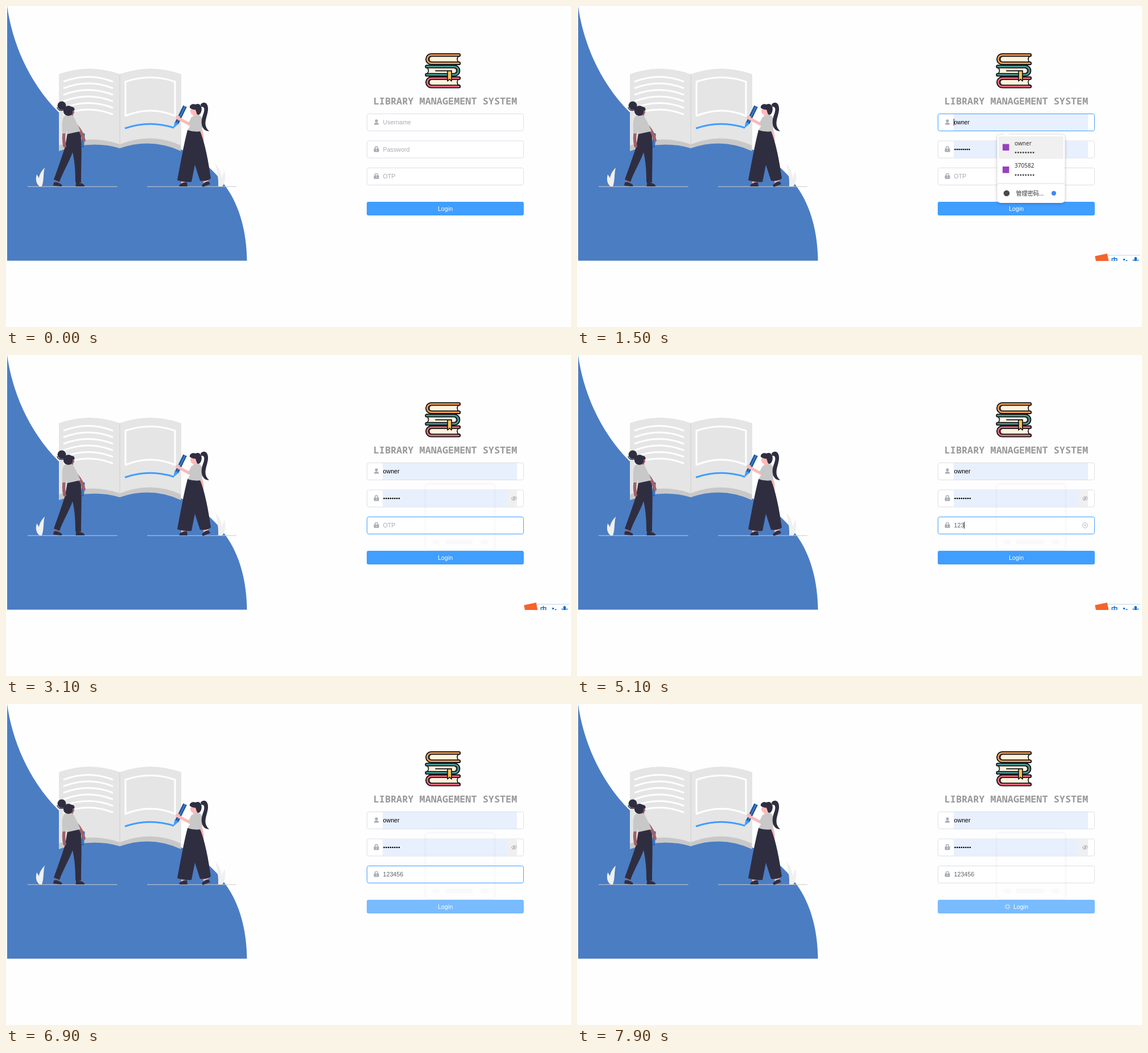
Animation, 993 px wide and 564 px high, one loop 8000 ms. Source, as an HTML page with a canvas:

```html
<!DOCTYPE html>
<html lang="en">
<head>
<meta charset="utf-8">
<title>Library login</title>
<style>
html, body { margin: 0; width: 100%; height: 100%; overflow: hidden; background: #fefefe; }
canvas { display: block; width: 993px; height: 564px; }
</style>
</head>
<body>
<canvas id="stage"></canvas>
<script>
const W = 993, H = 564, LOOP = 8000;
const canvas = document.getElementById('stage');
const dpr = window.devicePixelRatio || 1;
canvas.width = Math.round(W * dpr);
canvas.height = Math.round(H * dpr);
const c = canvas.getContext('2d');

const SANS = '"Liberation Sans", Arial, sans-serif';
const MENU = '"Noto Sans", "Open Sans", sans-serif';
const CJK = '"Noto Sans CJK SC", "Noto Sans CJK", sans-serif';
const MONO = '"Noto Sans Mono", "DejaVu Sans Mono", monospace';
const PLAIN = '#dcdfe6', HOVER = '#c0c4cc', FOCUS = '#409eff', MIXED = '#7eb8f5';
const DARK = '#2f2e41', GREY = '#c8c8c8', PINK = '#ffb8b8', BROWN = '#a0616a';
const ICON = '#a8abb2', TINT = '#e8f0fe';
const USER = 'owner', CODE = '123456';
const TYPED_AT = [4600, 4800, 5100, 5400, 5700, 6000];

function fill(d, color) {
  c.fillStyle = color;
  c.fill(new Path2D(d));
}
function line(d, color, width, cap = 'butt') {
  c.strokeStyle = color;
  c.lineWidth = width;
  c.lineCap = cap;
  c.lineJoin = 'round';
  c.stroke(new Path2D(d));
}
function dot(x, y, r, color) {
  c.fillStyle = color;
  c.beginPath();
  c.arc(x, y, r, 0, Math.PI * 2);
  c.fill();
}
function ring(x, y, r, color, width) {
  c.strokeStyle = color;
  c.lineWidth = width;
  c.beginPath();
  c.arc(x, y, r, 0, Math.PI * 2);
  c.stroke();
}
function rect(x, y, w, h, color) {
  c.fillStyle = color;
  c.fillRect(x, y, w, h);
}
function round(x, y, w, h, r) {
  c.beginPath();
  c.roundRect(x, y, w, h, r);
}
function text(s, x, y, size, color, font = SANS, weight = 400, align = 'left') {
  c.font = `${weight} ${size}px ${font}`;
  c.textAlign = align;
  c.fillStyle = color;
  c.fillText(s, x, y);
}
function bullets(x, y, step, r, color) {
  for (let i = 0; i < 8; i++) dot(x + i * step, y, r, color);
}
// Last value whose time has been reached.
function at(keys, t) {
  let value = keys[0][1];
  for (const [time, v] of keys) if (t >= time) value = v;
  return value;
}

function drawBackdrop() {
  fill('M2 0C10 60 38 132 92 186C160 250 240 215 308 252C340 266 366 288 386 317C412 353 423 400 423.5 447.5H2Z', '#4b7dc3');
}

function drawOpenBook() {
  fill('M93 120Q147 101 200 120Q254 101 307.500 120V255Q255 231 200 250Q150 235 93 255Z', GREY);
  fill('M93 120Q147 101 200 120Q254 101 307.500 120V245Q255 221 200 243Q150 225 93 245Z', '#e5e5e5');
  line('M200 120V249', '#d0d0d0', 1);
  for (let i = 0; i < 6; i++) {
    const y = 133 + i * 11.5;
    line(`M101 ${y}Q145 ${y - 17} 188 ${y}`, '#fff', 3);
  }
  line('M210 133Q254 118 297 133V193Q254 175 210 193Z', '#fff', 3);
  line('M209 215Q252 200 295 214', FOCUS, 3);
}

function drawPlants() {
  const leaf = '#f0f0f0';
  fill('M60 317C55 305 58 294 68 284C65 296 67 306 63 317Z', leaf);
  fill('M59 317C52 312 52 303 54 296C59 303 61 309 62 317Z', leaf);
  fill('M373 317C374 302 370 288 368 277C378 287 381 302 379 317Z', leaf);
  fill('M377 317C378 306 380 296 384 290C387 300 385 312 380 317Z', leaf);
  line('M38 317.300H195.500M248 317.300H405', '#cbcbcb', 1);
}

function drawLeftReader() {
  fill('M87 302L93 305L90 313H84Z M124 306H131V313H124Z', BROWN);
  fill('M84 310Q90 308 98 314Q100 317 96 317L83 315.500Z M123 310Q129 309 137 314Q140 317 136 317H122.500Z', DARK);
  fill('M108 223L131 220C134 240 132 280 132 310L122 310C122 285 120 270 117 257C111 274 100 292 94 309L84 305C91 285 98 266 104 247Z', DARK);
  line('M136 226L134.500 246', '#2465b5', 5, 'round');
  line('M136.500 226L135 246', '#4b8bdc', 1.500);
  line('M125 212Q134 222 137 236', BROWN, 5.500, 'round');
  fill('M108 187H118V197H108Z', BROWN);
  dot(114, 186, 6, BROWN);
  fill('M103 193L117 192Q121 198 127 211L131 220L108 225C107 218 104 213 98.500 209Q99 197 103 193Z', GREY);
  line('M103 218Q100 232 103 246', BROWN, 5.500, 'round');
  fill('M98.500 210L99 224L106 224L107 207Z', GREY);
  dot(98, 175, 7.500, DARK);
  fill('M101 181C104 175 111 174 115 177Q121 177 120.500 183L117 184Q118 192 110 193C103 193 100 188 101 181Z', DARK);
  line('M90 178Q91 185 102 183', DARK, 1.500);
}

function drawRightWriter() {
  line('M342 216Q347 230 344 243', PINK, 5, 'round');
  fill('M308 306H316V313H308Z M346 304L354 303L357 311L348 313Z', PINK);
  fill('M305 314Q313 308 318 310L319 317H304.500Z M344 315Q350 308 356 308L359 313L346 318Z', DARK);
  fill('M319 218L340 217C350 240 356 275 360 303Q352 309 341 307L332 279L326 309Q312 310 301 306C306 280 312 245 319 218Z', DARK);
  line('M300 206L314.500 176', '#3977c4', 7);
  line('M298 205.500L312.500 175.500M302 207L317 177', '#20477f', 1.500);
  fill('M294 215L296.500 203.500L303.500 207Z', FOCUS);
  line('M325 209L304 198', PINK, 5, 'round');
  dot(302, 196, 3.500, PINK);
  fill('M329 185H338V197H329Z', PINK);
  dot(330.500, 185, 6.500, PINK);
  fill('M326 195L339 191Q345 194 346 204L344 220Q330 222 319 218L324 210L320 207Z', GREY);
  fill('M323 179C322 173 329 171 333 173C341 169 346 178 343 186C341 192 336 193 335 188L333 182Q328 183 323 179Z', DARK);
  fill('M342 173C347 167 356 169 355 183C353 198 345 208 357 220C344 220 341 205 346 192C350 182 349 176 343 177Z', DARK);
}

function drawStackedBook(top, color, flip) {
  const bottom = top + 14.5;
  c.save();
  if (flip) {
    c.translate(1535.5, 0);
    c.scale(-1, 1);
  }
  const cover = `M796 ${top}H747.500A7.250 7.250 0 0 0 747.500 ${bottom}H796`;
  line(cover, '#111', 6.4, 'round');
  fill(`M748 ${top + 2}H795Q791 ${top + 7} 795 ${bottom - 2}H748A5 5 0 0 1 748 ${top + 2}Z`, '#fff3dc');
  line(`M748 ${top + 2.300}H795Q791 ${top + 7} 795 ${bottom - 2.300}H748A5 5 0 0 1 748 ${top + 2.300}Z`, '#111', 1.6);
  line(cover, color, 2.8, 'round');
  c.restore();
}

function drawBookStack() {
  drawStackedBook(86.2, '#f49b55', false);
  drawStackedBook(106.4, '#4a9b9b', true);
  drawStackedBook(126.800, '#e8697f', false);
  line('M755 113.800H783', '#111', 1.8, 'round');
  fill('M776 114H783V132L779.500 128.500L776 132Z', '#f8c25c');
  line('M776 114H783V132L779.500 128.500L776 132Z', '#111', 1.6);
}

function drawFrame(y, border) {
  round(634.5, y + 0.5, 275, 30, 3);
  c.fillStyle = '#fff';
  c.fill();
  c.strokeStyle = border;
  c.lineWidth = 1;
  c.stroke();
}
function drawLock(y) {
  c.fillStyle = ICON;
  round(646.5, y - 1.5, 9, 6, 1);
  c.fill();
  line(`M648.500 ${y - 1}V${y - 2.500}A2.500 2.500 0 0 1 653.500 ${y - 2.500}V${y - 1}`, ICON, 1.3);
  rect(650.5, y, 1, 2.5, '#fff');
}
function drawClear(y) {
  ring(893, y, 4.5, ICON, 0.9);
  line(`M891.300 ${y - 1.700}l3.400 3.400m0 -3.400l-3.400 3.400`, ICON, 0.9);
}
function drawEye(y) {
  line(`M888 ${y}Q893 ${y - 6.500} 898 ${y}Q893 ${y + 6.500} 888 ${y}Z`, ICON, 0.9);
  ring(893, y, 1.6, ICON, 0.9);
  line(`M889 ${y + 4}L897 ${y - 4}`, ICON, 0.9);
}
function caret(x, y) {
  rect(Math.round(x), y - 6, 1, 12, '#222');
}
function textWidth(s, size) {
  c.font = `${size}px ${SANS}`;
  return c.measureText(s).width;
}

function drawUserField(t) {
  drawFrame(189, at([[0, PLAIN], [900, HOVER], [1100, MIXED], [1200, FOCUS], [2600, MIXED], [2700, '#b8cfee'], [2800, PLAIN]], t));
  dot(651, 201.8, 2.6, ICON);
  fill('M647 208.500V207.500Q647 205 650 205H652Q655 205 655 207.500V208.500Z', ICON);
  const preview = t >= 1500 && t < 2000;
  if (t >= 1500) {
    rect(662, 190, 236, 29, TINT);
    text(USER, 662.5, 208, preview ? 10 : 10.7, '#000');
  } else {
    text('Username', 662.5, 208, 10.7, ICON);
  }
  if (t >= 2000 && t < 2600) {
    rect(881, 190, 17, 29, '#f0f0f3');
    drawClear(204);
  }
  if (t >= 1100 && t < 1600) caret(662, 204);
  if (t >= 2100 && t < 2600) caret(662.5 + textWidth(USER, 10.7), 204);
}

function drawPasswordField(t) {
  drawFrame(236.5, at([[0, PLAIN], [500, HOVER], [900, PLAIN], [2000, HOVER], [2200, PLAIN]], t));
  drawLock(252);
  if (t < 1500) {
    text('Password', 662.5, 255.8, 10.7, ICON);
    return;
  }
  rect(662, 237.5, 236, 29, TINT);
  bullets(664.6, 252, t < 2000 ? 3.55 : 3.75, 1.35, '#000');
  if (t >= 2000) {
    rect(881, 237.5, 17, 29, '#f0f0f0');
    drawEye(252);
  }
}

function drawCodeField(t) {
  drawFrame(284, at([[0, PLAIN], [2200, HOVER], [2600, MIXED], [2700, '#5aaafa'], [2800, FOCUS], [7000, MIXED], [7100, PLAIN]], t));
  drawLock(299.3);
  const typed = CODE.slice(0, TYPED_AT.filter(time => t >= time).length);
  text(typed || 'OTP', 662.5, 303.2, 10.7, typed ? '#606266' : ICON);
  if (typed && t < 6900) drawClear(299.3);
  const blink = t >= 2600 && t < 4600 && Math.floor((t - 2600) / 500) % 2 === 0;
  if (blink || (t >= 4600 && t < 6500)) caret(662.5 + textWidth(typed, 10.7), 299);
}

function drawButton(t) {
  c.fillStyle = at([[0, FOCUS], [6500, '#5dadff'], [6600, '#79bbff']], t);
  round(634, 344, 276, 24, 3);
  c.fill();
  const loading = t >= 7000;
  text('Login', loading ? 780 : 772, 360, 10.7, '#fff', SANS, 400, 'center');
  if (!loading) return;
  c.save();
  c.translate(756.5, 356);
  c.rotate((t - 7000) / 2000 * Math.PI * 2);
  for (let i = 0; i < 8; i++) {
    line('M0 -2.400V-4.600', '#fff', 0.9, 'round');
    c.rotate(Math.PI / 4);
  }
  c.restore();
}

function drawAccount(name, y) {
  rect(748, y + 2, 11.5, 11.5, '#9a3fc4');
  text(name, 769, y + 4, 10.1, '#333', MENU);
  bullets(771, y + 17, 4.45, 1.45, '#444');
}

function drawMenu(t) {
  if (t < 1100 || t >= 2400) return;
  const fade = t < 2000 ? 0 : (t - 1950) / 450;
  const scale = 1 - 0.07 * fade;
  c.save();
  c.globalAlpha = t < 1200 ? 0.4 : (1 - fade) ** 2;
  c.translate(798, 286);
  c.scale(scale, scale);
  c.translate(-798, -286);
  c.shadowColor = 'rgba(0,0,0,.28)';
  c.shadowBlur = 5;
  c.shadowOffsetY = 1;
  c.fillStyle = '#fff';
  round(738.5, 226, 119, 120, 6);
  c.fill();
  c.shadowColor = 'transparent';
  fill('M749 226.500L755 221.500L761 226.500Z', '#fff');
  c.fillStyle = '#f0f0f0';
  round(741, 229, 114, 39.5, 3);
  c.fill();
  drawAccount(USER, 240.5);
  drawAccount('370582', 280);
  rect(739, 311.5, 118, 1, '#dadce0');
  dot(755, 329, 5.3, '#4a4a4a');
  text('管理密码...', 771.5, 332.5, 10.1, '#333', CJK);
  dot(838, 329, 4, '#4285f4');
  c.restore();
}

// Faint outline the closed menu leaves behind.
function drawTrace(t) {
  if (t < 2200) return;
  c.strokeStyle = 'rgba(0,0,0,.025)';
  c.lineWidth = 3;
  round(737, 226, 122, 117, 6);
  c.stroke();
  line('M750 328.500H762M772 328.500H820M834 328.500H848', 'rgba(0,0,0,.02)', 8);
}

function drawInputBar(t) {
  if (t < 1100 || t >= 6900) return;
  c.save();
  c.beginPath();
  c.rect(900, 430, 90, 18);
  c.clip();
  rect(930, 438, 60, 10, '#fff');
  rect(932, 437.5, 58, 1, '#b9d5ee');
  c.save();
  c.translate(923, 447);
  c.rotate(-0.2);
  rect(-11, -10, 22, 22, '#f4642c');
  c.restore();
  const blue = '#0f6fd0';
  text('中', 938.5, 452, 12, blue, CJK, 700);
  dot(961.5, 445.500, 1.7, blue);
  dot(966, 448, 1.7, blue);
  c.fillStyle = blue;
  round(979.5, 441, 4.5, 8, 2.2);
  c.fill();
  line('M977.500 445V448H986V445', blue, 1.2);
  c.restore();
}

function draw(t) {
  c.setTransform(dpr, 0, 0, dpr, 0, 0);
  rect(0, 0, W, H, '#fefefe');
  drawBackdrop();
  drawOpenBook();
  drawPlants();
  drawLeftReader();
  drawRightWriter();
  drawBookStack();
  text('LIBRARY MANAGEMENT SYSTEM', 772, 173.3, 16.85, '#999', MONO, 700, 'center');
  drawUserField(t);
  drawPasswordField(t);
  drawCodeField(t);
  drawTrace(t);
  drawButton(t);
  drawMenu(t);
  drawInputBar(t);
}

function tick() {
  draw(Math.floor(performance.now() % LOOP / 100) * 100);
  requestAnimationFrame(tick);
}
tick();
</script>
</body>
</html>
```
